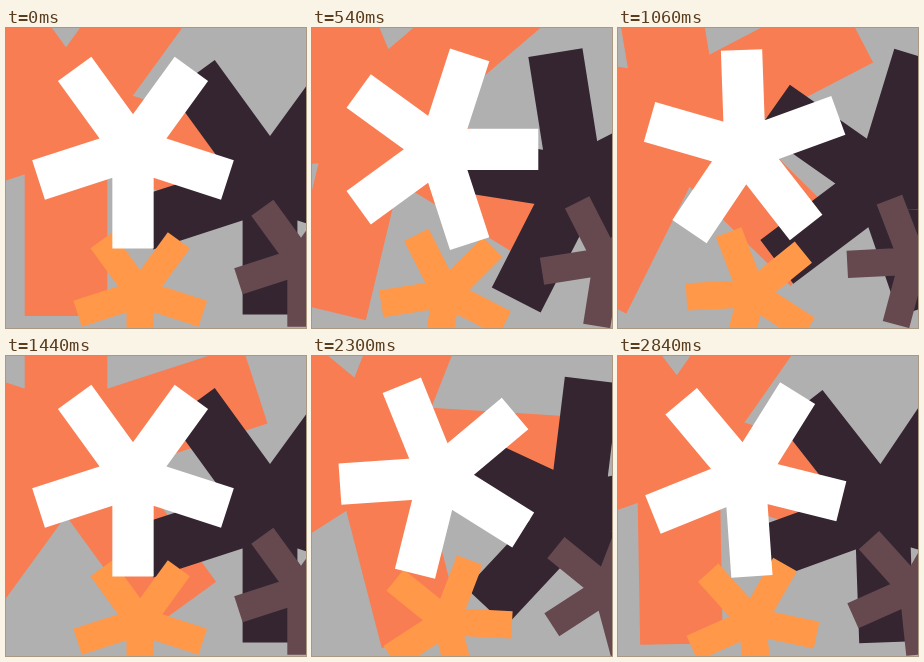
An HTML page with a canvas for the animation above (2.86 s loop, 300 by 300 pixels).

```html
<!DOCTYPE html>
<html lang="en">
<head>
<meta charset="utf-8">
<title>Spinning asterisks</title>
<style>
html, body { margin: 0; width: 100%; height: 100%; overflow: hidden; background: #b0b0b0; }
canvas { display: block; width: 100vw; height: 100vh; }
</style>
</head>
<body>
<canvas id="stage" width="300" height="300"></canvas>
<script>
const LOOP = 2860, STEP = 20;
const ctx = document.getElementById('stage').getContext('2d');

// Back to front; spin is in degrees per step
const stars = [
  { x: 60, y: 89.5, r: 198.5, spin: 0.5, color: '#f97d52' },
  { x: 264, y: 154.7, r: 131.7, spin: 1, color: '#342531' },
  { x: 295, y: 233, r: 65.8, spin: 3, color: '#65494f' },
  { x: 134.2, y: 265.5, r: 65.8, spin: 3, color: '#ff9849' },
  { x: 127, y: 121.3, r: 99.3, spin: 2, color: '#fff' }
];

function drawStar({ x, y, r, spin, color }, step) {
  ctx.strokeStyle = color;
  ctx.lineWidth = r * 0.416;
  ctx.beginPath();
  for (let arm = 0; arm < 5; arm++) {
    const a = (90 + arm * 72 + spin * step) * Math.PI / 180;
    ctx.moveTo(x, y);
    ctx.lineTo(x + r * Math.cos(a), y + r * Math.sin(a));
  }
  ctx.stroke();
}

const start = performance.now();

function draw() {
  const step = Math.floor((performance.now() - start) % LOOP / STEP);
  ctx.fillStyle = '#b0b0b0';
  ctx.fillRect(0, 0, 300, 300);
  stars.forEach(star => drawStar(star, step));
  requestAnimationFrame(draw);
}
draw();
</script>
</body>
</html>
```
